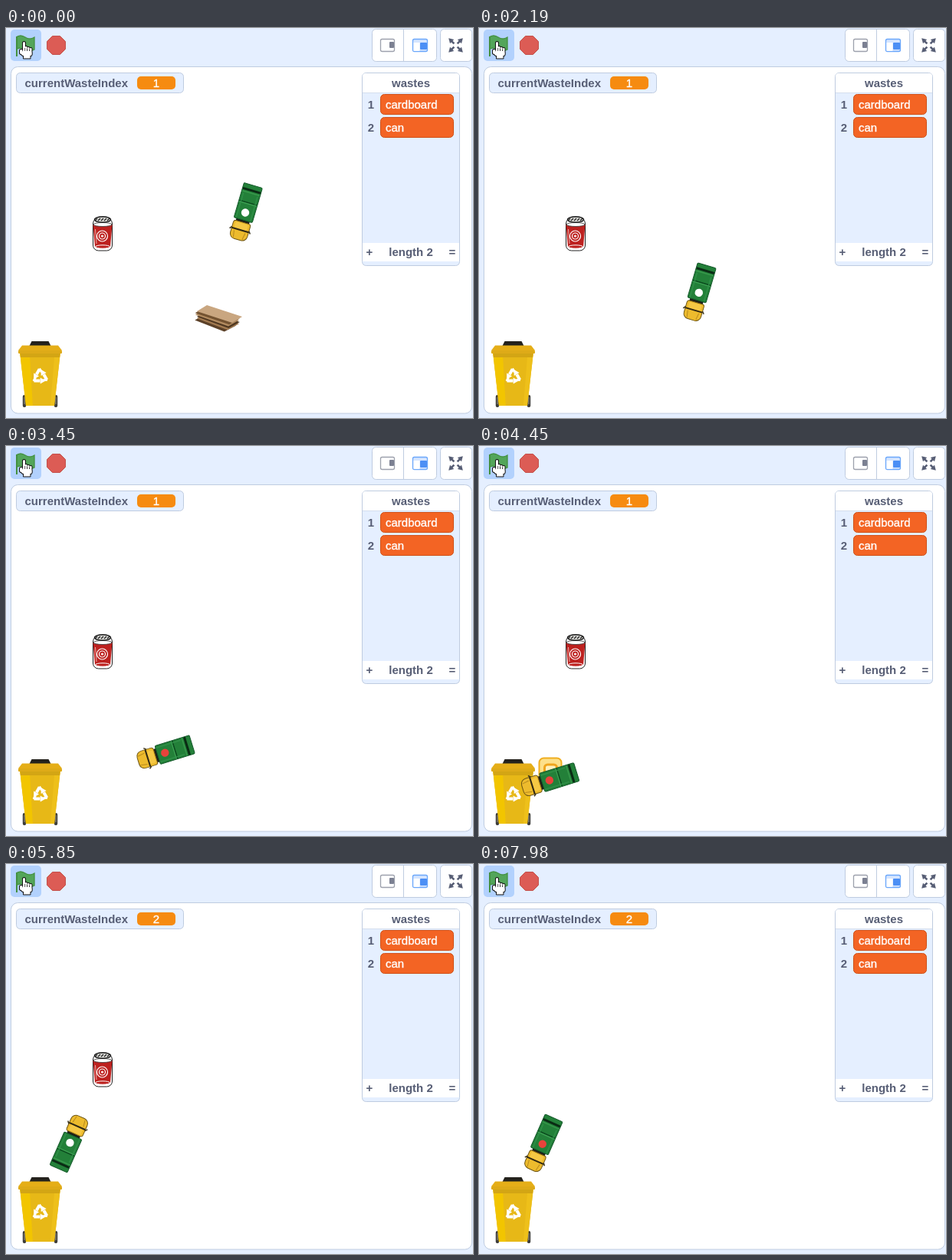
Animation of 609x508 px, one loop 8000 ms. Source, as an HTML page with a canvas:

```html
<!DOCTYPE html>
<html lang="en">
<head>
<meta charset="utf-8">
<title>Waste truck</title>
<style>
  html, body { margin: 0; width: 100%; height: 100%; overflow: hidden; background: #e5efff; }
  canvas { display: block; width: 609px; height: 508px; }
</style>
</head>
<body>
<canvas id="stage" width="609" height="508"></canvas>
<script>
const ctx = document.getElementById('stage').getContext('2d');
const LOOP = 8000, START = 730, STEP = 66.36, GLIDE = 2000, BLINK = 250;
const PANEL = '#e5efff', BORDER = '#bfcce0', INK = '#575e75';

const spot = (x, y) => ({ x, y });
const PARKED = spot(312, 240.5), HOME = spot(307, 276), BOARD = spot(277, 378);
const BIN = spot(45, 450), CAN = spot(126, 267);
const legs = [
  { at: 840, from: HOME, to: BOARD },
  { at: 2850, from: BOARD, to: BIN },
  { at: 4890, from: BIN, to: CAN },
  { at: 6895, from: CAN, to: BIN }
];

function paint(fill, stroke, width = 1) {
  if (fill) { ctx.fillStyle = fill; ctx.fill(); }
  if (stroke) { ctx.strokeStyle = stroke; ctx.lineWidth = width; ctx.stroke(); }
}
function box(x, y, w, h, r, fill, stroke, width) {
  ctx.beginPath();
  ctx.roundRect(x, y, w, h, r);
  paint(fill, stroke, width);
}
function line(x1, y1, x2, y2, color, width = 1) {
  ctx.beginPath();
  ctx.moveTo(x1, y1);
  ctx.lineTo(x2, y2);
  paint(null, color, width);
}
function oval(x, y, rx, ry, fill, stroke, width) {
  ctx.beginPath();
  ctx.ellipse(x, y, rx, ry, 0, 0, Math.PI * 2);
  paint(fill, stroke, width);
}
function polygon(x, y, r, sides, turn, fill, stroke, width) {
  ctx.beginPath();
  for (let i = 0; i < sides; i++) {
    const a = turn + i * Math.PI * 2 / sides;
    ctx.lineTo(x + r * Math.cos(a), y + r * Math.sin(a));
  }
  ctx.closePath();
  paint(fill, stroke, width);
}
// left and right are fractions of the full width, so slices share the taper
function taper(cx, top, topW, bottom, bottomW, fill, left = 0, right = 1) {
  const at = (w, k) => cx + w * (k - .5);
  ctx.beginPath();
  ctx.moveTo(at(topW, left), top);
  ctx.lineTo(at(topW, right), top);
  ctx.lineTo(at(bottomW, right), bottom);
  ctx.lineTo(at(bottomW, left), bottom);
  ctx.closePath();
  paint(fill);
}
function text(str, x, y, color, bold, align = 'left') {
  ctx.font = (bold ? 'bold ' : '') + '15px "Liberation Sans", Arial, sans-serif';
  ctx.textAlign = align;
  ctx.fillStyle = ctx.strokeStyle = color;
  ctx.fillText(str, x, y);
  if (!bold) {
    ctx.lineWidth = .35;
    ctx.strokeText(str, x, y);
  }
}

function drawFlag() {
  const wave = x => 2 * Math.sin((x - 13) / 24 * Math.PI * 2);
  ctx.beginPath();
  for (let x = 14; x <= 37; x++) ctx.lineTo(x, 12 - wave(x));
  for (let x = 37; x >= 14; x--) ctx.lineTo(x, 28 - wave(x));
  ctx.closePath();
  paint('#53a55a', '#43903f', 1.3);
  line(14, 11, 14, 37, '#43903f', 2);
}

function drawCursor() {
  // a dark, wider pass first leaves an outline around the joined hand
  for (const [grow, color] of [[1, '#111'], [0, '#fff']]) {
    const part = (x, y, w, h, r) =>
      box(x - grow, y - grow, w + 2 * grow, h + 2 * grow, r + grow, color);
    part(22, 18, 3, 18, 1.5);
    for (let i = 1; i < 4; i++) part(22 + i * 3, 23 + i, 2.5, 10, 1.2);
    part(18, 28, 3.5, 6, 1.7);
    part(20, 30, 13.5, 6, 3);
    part(23, 34, 8.5, 5.5, 0);
  }
  for (let i = 1; i < 4; i++) line(21.7 + i * 3, 25 + i, 21.7 + i * 3, 30, '#222', .8);
}

function drawHeader() {
  box(6, 2, 40, 41, 5, '#b2d1fd');
  drawFlag();
  drawCursor();
  polygon(65.5, 22.5, 13, 8, Math.PI / 8, '#dc5c55', '#c3504b');

  box(477.5, 1.5, 84, 42, 5, '#fff', BORDER);
  line(518.5, 2, 518.5, 43, BORDER);
  box(488.5, 14.5, 18, 16, 2, '#fff', '#9da1ad', 1.3);
  box(500, 18, 6, 8, 1, '#7b8092');
  box(530.5, 14.5, 19, 16, 2, '#d5e5ff', '#6ba7fa', 1.3);
  box(531.5, 19, 8, 11, 0, '#fff');
  box(540, 19, 9, 9, 1, '#4c8ff5');

  box(566.5, 1.5, 41, 42, 5, '#fff', BORDER);
  for (let i = 0; i < 4; i++) {
    ctx.save();
    ctx.translate(586.5, 22.5);
    ctx.rotate(i * Math.PI / 2 + Math.PI / 4);
    line(3, 0, 8, 0, INK, 2.6);
    polygon(9, 0, 4.2, 3, 0, INK);
    ctx.restore();
  }
}

function drawMonitor(index) {
  box(13.5, 58.5, 218, 26, 5, PANEL, BORDER);
  text('currentWasteIndex', 24.5, 77, INK, true);
  box(171, 63, 50, 17, 5, '#f68b10');
  text(index, 196, 77, '#fff', false, 'center');
}

function drawList() {
  box(464.5, 58.5, 127, 251, 5, PANEL, BORDER);
  box(465, 59, 126, 25, [4, 4, 0, 0], '#fff');
  line(465, 84.5, 591, 84.5, '#d4deee');
  text('wastes', 528, 77, INK, true, 'center');
  ['cardboard', 'can'].forEach((name, i) => {
    const y = 86.5 + i * 30;
    text(i + 1, 476, y + 18.5, INK, true, 'center');
    box(488.5, y, 95, 26, 5, '#f36424', '#cf5019');
    text(name, 495, y + 18.5, '#fff');
  });
  box(465, 280, 126, 24, 0, '#fff');
  text('+', 474, 297, INK, true, 'center');
  text('length 2', 528, 297, INK, true, 'center');
  text('=', 582, 297, INK, true, 'center');
}

function drawBin() {
  const cx = 44.5;
  for (const side of [-1, 1]) {
    box(cx + side * 20.5 - 2.2, 478, 4.4, 16, 2, '#3d3d3b');
    line(cx + side * 20.5, 481, cx + side * 20.5, 490, '#a09a86');
  }
  line(25, 491, 64, 491, '#4a4636', 2);
  const body = (color, from, to) => taper(cx, 422, 53, 492, 37, color, from, to);
  body('#e7b817', 0, 1);
  body('#f2c500', 0, .24);
  body('#eec01a', .86, 1);
  taper(cx, 424, 52, 429, 51, '#d3a514');
  taper(cx, 408, 22, 415, 29, '#24221d');
  taper(cx, 413.5, 47, 420, 57, '#e5ae18');
  box(16, 420, 57, 4, 1, '#deaa18');

  for (let i = 0; i < 3; i++) {
    ctx.save();
    ctx.translate(cx, 454);
    ctx.rotate(i * Math.PI * 2 / 3);
    line(-8, 5.5, 0, 5.5, '#fff', 4);
    line(-8.5, 6, -6, 1, '#fff', 3);
    polygon(2.5, 5.5, 4.6, 3, 0, '#fff');
    ctx.restore();
  }
}

function drawCan() {
  const { x, y } = CAN;
  box(x - 12.5, y - 20, 25, 43, [8, 8, 7, 7], '#fff', '#222', 1);
  taper(x, y - 11, 25, y + 18, 20, '#bd211f');
  oval(x, y - 11, 12, 2.5, '#fff', '#333', .8);
  oval(x, y + 18, 9.5, 2.2, '#bd211f', '#fff', 1);
  oval(x, y - 17.5, 10.5, 3.8, '#d8d8d4', '#171717', 1.4);
  for (let i = -2; i <= 2; i++) line(x + i * 4 - 2, y - 16, x + i * 4 + 1, y - 19, '#222', 1.3);
  for (let r = 7; r > 0; r -= 3) oval(x - .5, y + 4, r, r, null, '#fff', 1.2);
  line(x - 9.5, y - 5, x - 8, y + 14, '#e9b3ae');
}

function drawCardboard() {
  const shades = ['#c9a680', '#745331', '#b28b60', '#4f3720', '#a27a50', '#5c4128'];
  for (let i = shades.length - 1; i >= 0; i--) {
    const slide = i ? 2 * Math.sin(i * 5) : 0;
    ctx.save();
    // unit square skewed into a sheet lying on the stack
    ctx.transform(46 - i * 1.5, 15, -13 - i * .5, 8, 262 + slide, 361 + i * 2.3);
    ctx.fillStyle = shades[i];
    ctx.fillRect(0, 0, 1, 1);
    ctx.restore();
  }
}

function drawPrize() {
  box(78.5, 406.5, 29, 29, 6, '#fde08a', '#f0ae20', 2);
  box(85.5, 415, 16, 16, 4, '#fff0bd', '#f0a51d', 3);
}

function drawTruck({ x, y }, angle, red) {
  const across = (at, color, width, half = 12) => line(at, -half, at, half, color, width);
  ctx.save();
  ctx.translate(x, y);
  ctx.rotate(angle);
  box(8, -9, 8, 18, 1, '#1b1d17');
  box(-37, -12.5, 47, 25, 1.5, '#238039', '#14592a', 1);
  across(-30, '#0a2b14', 3);
  across(-26.5, '#38984b', 1.5);
  across(-13.5, '#0b4a1e', 1.5);
  across(-12, '#3fa254', 1.2);
  for (const side of [-9.5, 9.5]) line(-24, side, 9, side, '#31924a', 1.2);

  box(13, -11.5, 23.5, 23, [3, 7, 7, 3], '#edbb2d', '#6f5716', 1);
  box(14.5, -8.5, 8, 17, 2, '#f5c844');
  across(23.5, '#302812', 2, 11.5);
  for (const side of [-1, 1]) {
    line(26, side * 7.5, 35, side * 6, '#b88a1d');
    line(22, side * 11.5, 25, side * 14, '#39331d', 1.5);
  }
  oval(0, 0, 5.2, 5.2, red ? '#e8433b' : '#fff');
  ctx.restore();
}

function truckPose(t) {
  const { at, from, to } = legs.findLast(leg => leg.at <= t) || legs[0];
  const dx = to.x - from.x, dy = to.y - from.y;
  const k = Math.min(1, Math.max(0, (t - at) / GLIDE));
  return {
    pos: t < START ? PARKED : spot(from.x + dx * k, from.y + dy * k),
    angle: Math.atan2(dy, dx)
  };
}

function draw(now) {
  const time = now % LOOP;
  // the stage refreshes about 15 times a second
  const t = time < START ? 0 : START + Math.floor((time - START) / STEP + .1) * STEP;
  ctx.fillStyle = PANEL;
  ctx.fillRect(0, 0, 609, 508);
  drawHeader();
  box(6.5, 50.5, 601, 451.5, 9, '#fff', BORDER);
  drawBin();
  if (t < 1830) drawCardboard();
  if (t < 6250) drawCan();
  if (t >= 4280 && t < 4890) drawPrize();
  const { pos, angle } = truckPose(t);
  const red = t >= START && Math.floor((t + 105) / BLINK) % 2 === 0;
  drawTruck(pos, angle, red);
  drawMonitor(t < 4870 ? 1 : 2);
  drawList();
}

const origin = performance.now();
function tick() {
  draw(performance.now() - origin);
  requestAnimationFrame(tick);
}
tick();
</script>
</body>
</html>
```
